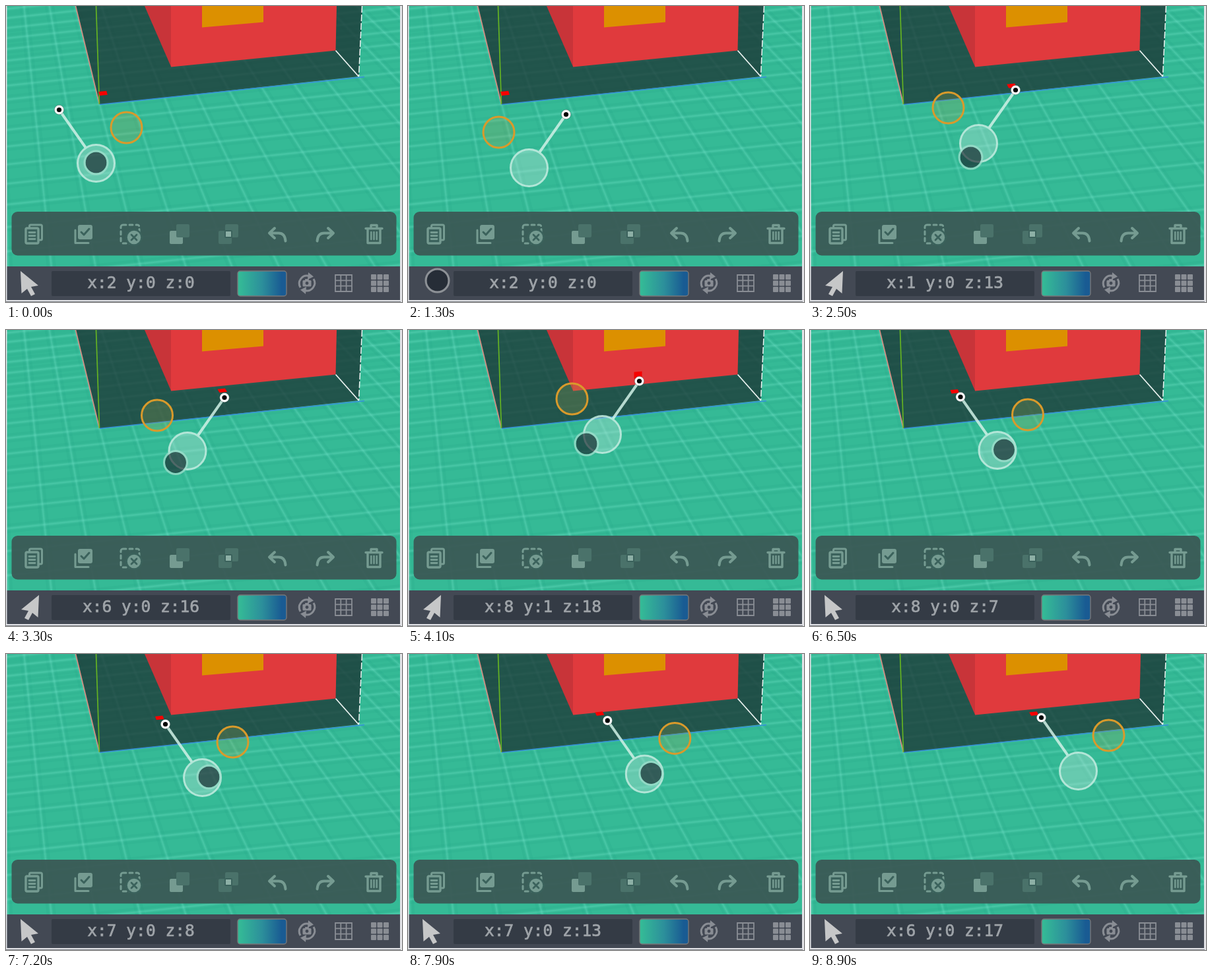
Animation of 600 by 449 pixels, one loop 9 s. Source, as an HTML page with a canvas:

```html
<!DOCTYPE html>
<html lang="en">
<head>
<meta charset="utf-8">
<style>
  html, body { margin: 0; width: 100%; height: 100%; overflow: hidden; background: #e2e3e7; }
  canvas { display: block; }
</style>
</head>
<body>
<canvas id="stage" width="600" height="449"></canvas>
<script>
const c = document.getElementById('stage').getContext('2d');
const LOOP = 9000, STEP = 100;
const FLIP_ON = 1250, FLIP_OFF = 5150;

// [time, x, y]; equal times make a jump
const padKeys = [[0, 136, 238], [900, 211, 245], [FLIP_ON, 211, 245], [FLIP_ON, 183, 245], [1800, 183, 245],
  [2500, 255, 208], [4100, 294, 158], [4600, 242, 178], [FLIP_OFF, 242, 178], [FLIP_OFF, 270, 177],
  [5800, 270, 177], [7200, 297, 187], [8500, 406, 177], [LOOP, 406, 177]];
const fingerKeys = [[0, 136, 237], [900, 211, 244], [1200, 44, 416], [1400, 44, 416], [1800, 171, 266],
  [2500, 243, 229], [4100, 270, 172], [4600, 218, 192], [5000, 44, 416], [5200, 44, 416],
  [5500, 217, 252], [5800, 280, 176], [7200, 307, 186], [8500, 416, 176], [LOOP, 416, 176]];

function at(keys, t) {
  const i = keys.findIndex(k => k[0] > t);
  const [t0, x0, y0] = keys[i - 1], [t1, x1, y1] = keys[i];
  const p = (t - t0) / (t1 - t0), e = p * p * (3 - 2 * p);
  return [x0 + (x1 - x0) * e + 0.5, y0 + (y1 - y0) * e + 0.5];
}

// Ground plane in voxels: u along the front edge, v into the depth
const VX = -29, VY = -536, AX = 171, AY = 685, UX = 12.25, UY = -1.3125, DEPTH = 0.00816;
function project(u, v) {
  const s = 1 / (1 + DEPTH * v);
  return [VX + s * (AX + u * UX), VY + s * (AY + u * UY)];
}
function unproject(x, y) {
  const qx = x - VX, qy = y - VY;
  const s = (qx * UY - qy * UX) / (AX * UY - AY * UX);
  return [(qx / s - AX) / UX, (1 / s - 1) / DEPTH];
}

function poly(pts, fill) {
  c.beginPath();
  pts.forEach(p => c.lineTo(...p));
  c.closePath();
  c.fillStyle = fill;
  c.fill();
}
function line(pts, color, width = 1.3) {
  c.beginPath();
  pts.forEach(p => c.lineTo(...p));
  c.strokeStyle = color;
  c.lineWidth = width;
  c.stroke();
}
function disc(x, y, r, fill, stroke, width) {
  c.beginPath();
  c.arc(x, y, r, 0, 7);
  if (fill) { c.fillStyle = fill; c.fill(); }
  if (stroke) { c.strokeStyle = stroke; c.lineWidth = width; c.stroke(); }
}
function box(x, y, w, h, r, fill, stroke, width = 3) {
  c.beginPath();
  c.roundRect(x, y, w, h, r);
  if (fill) { c.fillStyle = fill; c.fill(); }
  if (stroke) { c.strokeStyle = stroke; c.lineWidth = width; c.stroke(); }
}
function path(d, color, width = 3) {
  c.strokeStyle = color;
  c.lineWidth = width;
  c.stroke(new Path2D(d));
}

function ground() {
  c.fillStyle = '#35ba96';
  c.fillRect(0, 0, 600, 396);
  for (const [color, width] of [['rgba(16,140,112,.08)', 14], ['rgba(120,230,202,.1)', 6], ['rgba(120,230,202,.2)', 2.5]]) {
    for (let u = -32; u <= 80; u += 4) line([project(u, -44), project(u, 60)], color, width);
    for (let v = -44; v <= 60; v += 4) line([project(-32, v), project(80, v)], color, width);
  }
}

function model() {
  poly([[105, 0], [540, 0], [534.5, 107], [142, 149.5]], 'rgba(27,50,50,.74)');
  poly([[105, 0], [136, 0], [141, 149]], 'rgba(25,65,62,.2)');
  poly([[501, 0], [540, 0], [534, 107], [499, 67]], 'rgba(25,65,62,.2)');
  line([[105.5, 0], [141.5, 149]], '#d98f84', 1.6);
  line([[136.5, 0], [141.5, 149]], '#65b322', 1.7);
  line([[142, 149.5], [543, 107.5]], '#348fdc', 1.3);
  c.setLineDash([10, 3]);
  line([[539.5, 0], [534.5, 107]], '#eef5f3', 1.5);
  c.setLineDash([]);
  line([[534.5, 107], [499.5, 67.5]], '#eef5f3', 1.7);
  poly([[210, 0], [251, 0], [250, 92]], '#c83439');
  poly([[250, 0], [501, 0], [499.5, 67.5], [250, 92.5]], '#e03a3d');
  poly([[297, 0], [390, 0], [390, 24.5], [297, 32.5]], '#dc9000');
}

function tipAt(t) {
  const [x, y] = at(padKeys, t), side = t >= FLIP_ON && t < FLIP_OFF ? 1 : -1;
  return [x + 56 * side, y - 81];
}

// Voxel under the pointer; it keeps its place while nothing is dragged
function pick(t) {
  if (t < 1900) return { x: 2, y: 0, z: 0 };
  if (t > 4600 && t < 5850) t = 4600;
  const [tx, ty] = tipAt(t), px = tx - 10.5, py = ty - 6.5;
  const foot = 92 - (px - 250) * 0.1;
  const onBlock = px > 250 && py < foot;
  const [u, v] = unproject(px, onBlock ? foot : py);
  const clamp = (n, max) => Math.max(0, Math.min(max, Math.floor(n)));
  return { x: clamp(v, 8), y: onBlock ? clamp((foot - py) / 11, 9) : 0, z: clamp(u, 31), onBlock };
}

function voxel({ x, y, z, onBlock }) {
  if (onBlock) {
    const [px, py] = project(z, 8);
    const l = px + 4, b = py - 11 * y;
    poly([[l, b], [l, b - 10], [l + 12, b - 11], [l + 12, b - 1]], '#f60000');
  } else {
    const shift = ([a, b]) => [a + 2.5, b - 2];
    poly([project(z, x), project(z, x + 1.1), project(z + 1, x + 1.1), project(z + 1, x)].map(shift), '#f60000');
  }
}

function pointer(t) {
  const [x, y] = at(padKeys, t), [tx, ty] = tipAt(t), side = Math.sign(tx - x);
  line([[tx, ty], [x + side * 16, y - 24]], 'rgba(208,241,231,.85)', 4);
  disc(x, y, 28, 'rgba(190,230,218,.36)', 'rgba(196,237,225,.85)', 3);
  disc(x - side * 46, y - 54, 23.5, 'rgba(150,160,80,.25)', '#d99a2b', 3);
  disc(tx, ty, 7.2, '#fff', 'rgba(20,50,45,.35)', 1);
  disc(tx, ty, 3.6, '#000');
}

function tools() {
  const ink = '#759b91', back = '#3b625c', dim = '#4a726a';
  box(8.5, 312, 583, 66.5, 9, 'rgba(59,88,84,.93)');
  c.lineCap = c.lineJoin = 'round';

  // copy
  box(35.5, 332, 19, 23, 2, null, ink);
  box(30, 337, 19, 23, 2, back, ink, 3.4);
  path('M35 343.500h9M35 348.500h9M35 353.500h9', ink, 2.8);
  // select all
  path('M105 340v19.500h20', ink, 3);
  box(109, 332, 22, 22, 3, ink);
  path('M114 343l4 4 8-9', back, 3);
  // deselect
  c.setLineDash([5, 5]);
  box(174, 332, 28, 28, 3, null, ink);
  c.setLineDash([]);
  disc(194, 351, 11.5, ink, back, 2.5);
  path('M190 347l8 8M198 347l-8 8', back, 2.8);
  // union
  box(248, 341, 20, 20, 2, ink);
  box(258, 331, 20, 20, 2, dim);
  // intersection
  box(332, 331, 20, 20, 2, dim);
  box(322, 341, 20, 20, 2, dim);
  box(332, 341, 10, 10, 1, '#8db0a6', back, 2);
  // undo, redo
  path('M407 337l-8 7.500 8 7.500M400 344.500h13c7 0 10 5 10.500 12', ink, 4);
  path('M488 337l8 7.500-8 7.500M495 344.500h-13c-7 0-10 5-10.500 12', ink, 4);
  // delete
  path('M545 337.500h25M553 336.500v-4h9v4M548 338v21.500h19v-21.500', ink, 3.4);
  path('M553.300 343v11M557.500 343v11M561.700 343v11', ink, 2.5);
  c.lineCap = 'butt';
  c.lineJoin = 'miter';
}

function statusBar(t, v) {
  const ink = '#898d94', text = '#9fa4a9';
  c.fillStyle = '#434954';
  c.fillRect(0, 395, 600, 52);
  box(69, 402, 271, 38, 2, '#343b45');
  c.font = '24.5px "DejaVu Sans Mono", "Liberation Mono", monospace';
  c.textAlign = 'center';
  c.fillStyle = c.strokeStyle = text;
  c.lineWidth = 0.7;
  const label = `x:${v.x} y:${v.y} z:${v.z}`;
  c.fillText(label, 204.5, 427.5);
  c.strokeText(label, 204.5, 427.5);

  const g = c.createLinearGradient(351, 0, 425, 0);
  g.addColorStop(0, '#35bd96');
  g.addColorStop(.5, '#2c8f9b');
  g.addColorStop(.9, '#195b93');
  box(351, 402, 74, 38, 4, g, '#777779', 1.4);

  // camera in turning arrows
  path('M446 427a11.800 11.800 0 0 1 13-17.500M466 414a11.800 11.800 0 0 1-13 17.500', ink, 3);
  poly([[458, 404], [466, 410.5], [457, 415]], ink);
  poly([[454, 437], [446, 430.5], [455, 426]], ink);
  box(449.5, 416, 13, 9.5, 1.5, ink);
  box(453, 414, 6, 3, 1, ink);
  disc(456, 420.5, 2.4, '#434954');

  path('M499 408h25v25h-25zM507.300 408v25M515.600 408v25M499 416.300h25M499 424.600h25', ink, 1.8);
  for (let i = 0; i < 9; i++) box(553 + i % 3 * 9.5, 407 + Math.floor(i / 3) * 9.5, 8, 8, 1, ink);

  const pressed = t >= 1200 && t <= 1400 || t >= 5000 && t <= 5200;
  const flipped = t >= FLIP_ON && t < FLIP_OFF;
  const arrow = [[22, 402], [49, 424], [38, 426], [44, 437], [38, 440], [32, 429], [23.5, 436]];
  if (!pressed) poly(arrow.map(([x, y]) => [flipped ? 72 - x : x, y]), '#c6c7c8');
}

function finger(t) {
  if (t > 8550) return;
  const [x, y] = at(fingerKeys, t);
  disc(x, y, 16, 'rgba(22,30,38,.63)');
  disc(x, y, 17.5, null, y > 390 ? '#8d9196' : 'rgba(160,222,204,.75)', 3);
}

function edges() {
  c.fillStyle = '#e2e3e7';
  c.fillRect(0, 0, 1.5, 449);
  c.fillRect(597, 0, 3, 449);
  c.fillRect(0, 446, 600, 3);
  c.fillStyle = '#777b82';
  c.fillRect(0, 448, 598, 1);
}

function draw(now) {
  const t = Math.floor(now % LOOP / STEP) * STEP;
  const v = pick(t);
  ground();
  model();
  voxel(v);
  pointer(t);
  tools();
  statusBar(t, v);
  finger(t);
  edges();
}

const start = performance.now();
(function frame() {
  draw(performance.now() - start);
  requestAnimationFrame(frame);
})();
</script>
</body>
</html>
```
